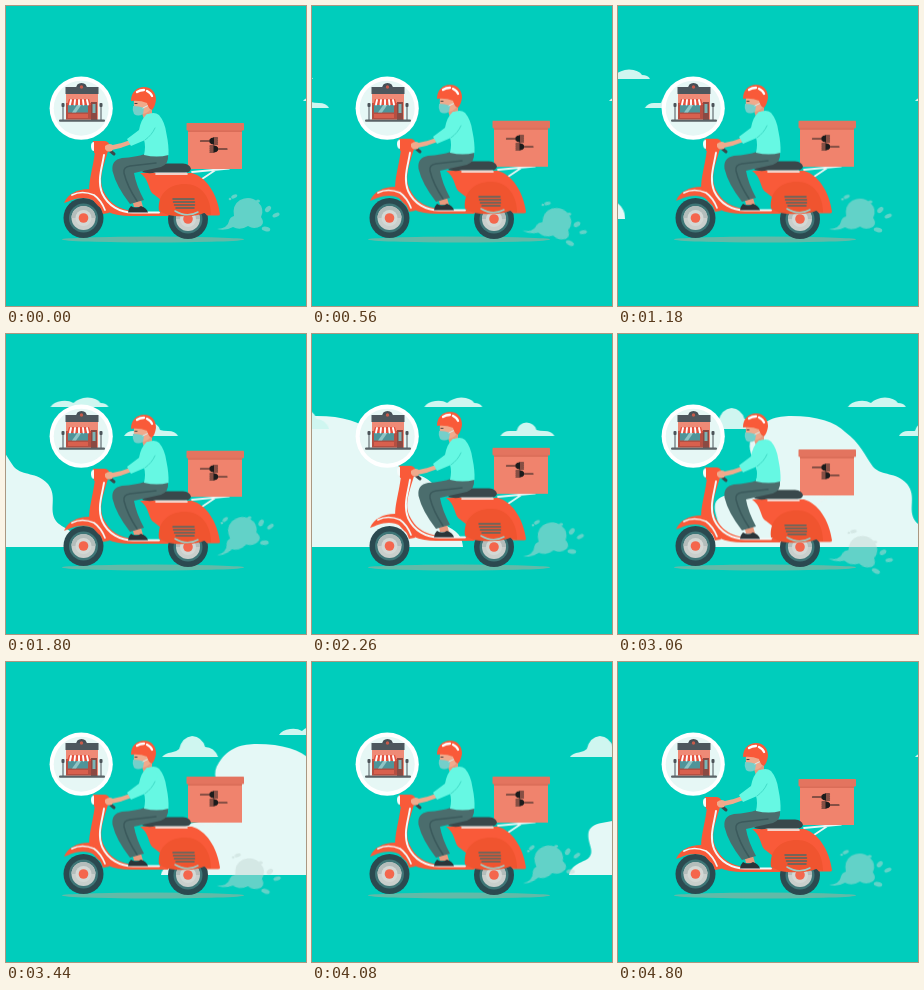
An HTML page that plays this animation: 300 px wide and 300 px high, repeating every 4820 ms.

```html
<!DOCTYPE html>
<html lang="en">
<head>
<meta charset="utf-8">
<title>Scooter delivery</title>
<style>
  html, body { margin: 0; width: 100%; height: 100%; overflow: hidden; background: #00cdbc; }
  svg { display: block; width: 100vw; height: 100vh; }

  :root { --loop: 4820ms; --sine: cubic-bezier(.37, 0, .63, 1); }

  .drift { animation: var(--loop) var(--sine) infinite; }
  .hill { animation-name: hill; animation-delay: -3998ms; }
  .cloud-a { animation-name: cloud-a; }
  .cloud-b { animation-name: cloud-b; animation-delay: -4370ms; }
  .cloud-c { animation-name: cloud-c; animation-delay: -3081ms; }
  @keyframes hill {
    0% { transform: translate(-245px, 213px); }
    83.8%, 100% { transform: translate(305px, 213px); }
  }
  @keyframes cloud-a {
    0% { transform: translate(-57px, 102px); }
    76.3%, 100% { transform: translate(305px, 102px); }
  }
  @keyframes cloud-b {
    0% { transform: translate(-58px, 73px); }
    79.5%, 100% { transform: translate(315px, 73px); }
  }
  @keyframes cloud-c {
    0% { transform: translate(-65px, 95px); }
    61.9%, 100% { transform: translate(297px, 95px); }
  }

  .bob { animation: bob 964ms var(--sine) infinite; }
  @keyframes bob { 0%, 100% { transform: none; } 35% { transform: translateY(-3.2px); } }

  .dust {
    transform-origin: 205px 222px;
    animation: sway 1205ms var(--sine) -602.5ms infinite alternate;
  }
  @keyframes sway { from { transform: rotate(-15deg); } to { transform: rotate(15deg); } }

  .line { fill: none; stroke-linecap: round; stroke-linejoin: round; }
</style>
</head>
<body>
<svg viewBox="0 0 300 300" preserveAspectRatio="none">
  <defs>
    <g id="wheel">
      <circle r="20" fill="#2b4a50"/>
      <circle r="14.5" fill="#3f7677"/>
      <circle r="12" fill="#c9cfcc"/>
      <path d="M-12 0A12 12 0 0 1 12 0Z" fill="#b3bdbb"/>
      <circle r="8" fill="#d3d8d5"/>
      <circle r="4.8" fill="#f4664d"/>
    </g>
    <g id="fork">
      <path class="line" d="M-9 0H1M4 -3H8M4 -1H8M4 1H8M4 3H8" stroke="#1c1c1c" stroke-width="1.2"/>
      <path d="M0 -1.500Q1 -3.600 4.500 -3.600V3.600Q1 3.600 0 1.500Z" fill="#1c1c1c"/>
    </g>
    <g id="lamp">
      <path class="line" d="M0 0V15" stroke="#4b5358" stroke-width="1"/>
      <rect x="-1.5" y="-2" width="3" height="4" rx="1" fill="#4b5358"/>
    </g>
  </defs>

  <!-- scenery -->
  <path class="drift hill" fill="#e5f8f6" d="M0 0C4 -12 14 -12 20 -17C27 -24 18 -32 20 -43C24 -56 46 -50 55 -59C66 -68 62 -76 60 -84C56 -92 51 -102 58 -112C68 -128 82 -131 96 -131C122 -131 140 -125 150 -115C165 -104 170 -91 178 -80C188 -70 200 -76 212 -63C222 -50 212 -38 220 -26C226 -18 241 -18 242 0Z"/>
  <g fill="#cff6f0">
    <path class="drift cloud-a" d="M0 0Q3 -5 9 -5Q14 -5 16 -5Q18 -13 26 -13.5Q34 -13 36 -6Q39 -5 44 -5Q51 -5 54 0Z"/>
    <path class="drift cloud-b" d="M0 0Q3 -5 11 -6Q18 -7 23 -4Q28 -9 37 -9.5Q47 -9 50 -4Q56 -4 58 0Z"/>
    <path class="drift cloud-c" d="M0 0Q3 -4 9 -4.5Q14 -5 17 -8Q20 -20 30 -21Q40 -20 43 -10Q52 -10 56 0Z"/>
  </g>

  <ellipse cx="147" cy="233.500" rx="91" ry="3" fill="#b2ac98" opacity=".55"/>

  <g class="dust" fill="#c4d8d4" opacity=".5">
    <path d="M211 223Q222 222 223 215Q224 211 228 210Q226 199 234 194Q244 189 252 196Q259 203 255 211Q259 217 255 220Q248 224 242 220Q234 225 227 221Q220 225 211 223Z"/>
    <ellipse cx="228" cy="190.500" rx="3.2" ry="1.8" transform="rotate(-25 228 190)"/>
    <circle cx="224" cy="193" r="1.3"/>
    <ellipse cx="252" cy="195" rx="2" ry="1.6"/>
    <ellipse cx="262" cy="203" rx="3.6" ry="2.3" transform="rotate(-45 262 203)"/>
    <ellipse cx="270" cy="209" rx="3.8" ry="2" transform="rotate(-25 270 209)"/>
    <ellipse cx="260" cy="223" rx="4.3" ry="2.3" transform="rotate(12 260 223)"/>
  </g>

  <!-- shop bubble -->
  <circle cx="75.2" cy="102.2" r="31.6" fill="#fff"/>
  <circle cx="75.2" cy="102.2" r="27.5" fill="#e6f7f5"/>
  <g>
    <path d="M70 83Q70 77 75.500 77Q81 77 81 83Z" fill="#454f56"/>
    <rect x="59.500" y="81" width="33" height="7" fill="#4d575d"/>
    <circle cx="75.500" cy="81" r="1.700" fill="#c65b4b"/>
    <rect x="60" y="88" width="32" height="26" fill="#ef8a76"/>
    <rect x="60" y="97" width="25" height="16" fill="#b54f42"/>
    <rect x="62" y="98" width="20" height="8.500" fill="#4f9499"/>
    <path d="M66 106.500L72 98H76L70 106.500Z" fill="#8fc4c4"/>
    <rect x="62" y="108" width="20" height="4" fill="#d8604e"/>
    <rect x="85" y="96" width="6" height="18" fill="#8a4a43"/>
    <rect x="86.500" y="98" width="3" height="9" fill="#7ab5b6"/>
    <path d="M63 93H83L85 99H61Z" fill="#e5503d"/>
    <path class="line" d="M65 94L64 98.500M69 94L68.500 98.500M73 94V98.500M77 94L77.500 98.500M81 94L82 98.500" stroke="#fff" stroke-width="1.900"/>
    <use href="#lamp" x="57" y="99"/>
    <use href="#lamp" x="95" y="99"/>
    <rect x="53" y="113.500" width="46" height="2.300" rx="1" fill="#5a6367"/>
  </g>

  <use href="#wheel" x="77.500" y="212"/>
  <use href="#wheel" x="182" y="213"/>

  <g class="bob">
    <!-- rack and box -->
    <path class="line" d="M188 175H193L211 163M148 166H180M186 166L223 162.500" stroke="#e9f6f4" stroke-width="1.800"/>
    <rect x="182" y="118" width="54" height="45" fill="#f0836d"/>
    <rect x="182" y="124" width="54" height="2" fill="#da6d58"/>
    <rect x="180.500" y="117" width="57.500" height="7.500" rx=".8" fill="#e3745f"/>
    <use href="#fork" x="203.500" y="135"/>
    <use href="#fork" transform="translate(212 143) scale(-1 1)"/>

    <!-- scooter -->
    <path d="M89 145H102C97 162 92 174 98 186C105 200 117 205 136 206H162V210H124C108 210 93 205 85 191C80 182 87 164 89 145Z" fill="#f95a39"/>
    <path d="M58 197C62 188 71 183 83 183C93 184 100 195 103 207L97 208C93 195 85 192 77 192C69 192 64 195 58 197Z" fill="#f95a39"/>
    <path class="line" d="M66 189Q76 184 88 189Q95 194 99 204" stroke="#f3faf9" stroke-width="1.700"/>
    <path class="line" d="M98 149C96 162 91 174 96 187C102 200 114 206.500 127 206.500H153" stroke="#f3faf9" stroke-width="1.900"/>
    <path d="M134 167H186C200 171 211 187 214 208Q214 209.500 212 209.500H201C197 203 190 205 181 205C170 205 166 203 162 210C161 196 152 192 146 187C142 182 143 173 134 167Z" fill="#f95a39"/>
    <path d="M153 205C151 188 163 178 179 178C195 178 205 191 205 209L198 207C190 211 171 211 162 209Z" fill="#f0542f"/>
    <path class="line" d="M167 193H188M167.500 196H188.500M168.500 199H188.500M170 202H188" stroke="#4f6a66" stroke-width="1.500"/>
    <path class="line" d="M169 205Q181 212 192 206" stroke="#9ecdc6" stroke-width="1.500"/>
    <path d="M136 166C143 159 150 158 160 157.500H177Q184 158 185 163Q184 167 178 166.500H150Q142 168 136 166Z" fill="#39484b"/>
    <path class="line" d="M150 168H181" stroke="#f3faf9" stroke-width="1.600"/>
    <path d="M87 135H99Q104 136 104 142Q103 147 98 147H88Z" fill="#f95a39"/>
    <path d="M88 136Q85 136 85 140Q85 145 88 145Z" fill="#f5faf9"/>
    <path class="line" d="M102 143L108 148" stroke="#39484b" stroke-width="3"/>

    <!-- rider -->
    <path d="M127 197L135 194L137 201H128Z" fill="#e99a7d"/>
    <path d="M125 200Q130 203 135 200Q141 202 142 206.500H122Q122 203 125 200Z" fill="#2a3539"/>
    <path d="M139 148L162 149Q163 158 155 161L128 167Q130 179 138 194L124 198Q110 180 106.500 165Q105 154 116 152Q130 151 139 148Z" fill="#4b6d6d"/>
    <path class="line" d="M150 157L124 160Q117 161 118 167Q121 180 131 195" stroke="#3b5a5c" stroke-width="1.500"/>
    <path d="M134 102H146V113H138Z" fill="#e69a7e"/>
    <path class="line" d="M125 136L115 139.500L104 142" stroke="#f0aa8c" stroke-width="4.500"/>
    <path d="M99 140Q104 136 108 140L106 145Q101 147 99 143Z" fill="#f0aa8c"/>
    <path d="M140 109Q148 105 153 109Q159 116 160.500 128Q163 140 162.500 149Q151 152 138 149Q140 140 138 134Z" fill="#66f8e3"/>
    <path d="M141 108Q135 113 133 124L121 133L125 140L138 134.500Q148 127 152 116L149 108Z" fill="#66f8e3"/>
    <path class="line" d="M139 134Q146 129 149 122" stroke="#43dcc8" stroke-width="1"/>
    <path d="M128 94H144V104Q139 110 130 107Q127 101 128 94Z" fill="#f0aa8c"/>
    <path d="M142 97H147Q147 101 144 103Z" fill="#6b453c"/>
    <path d="M127 100Q133 100 138 102L137 108Q132 111 128 108Q126 104 127 100Z" fill="#74cfca"/>
    <path class="line" d="M137 102L143 99" stroke="#d9f0ee" stroke-width="1"/>
    <path class="line" d="M129 97.500H131" stroke="#4b4241" stroke-width="1.200"/>
    <path d="M125 95C125 86 131 81 138 81C146 81 150 87 150 94Q149 101 146 104Q142 102 141 97Q134 94 125 95Z" fill="#f95a39"/>
    <path class="line" d="M131 86Q134 84 138 84M141 85Q145 87 146 90" stroke="#fff" stroke-width="2.300"/>
  </g>
</svg>
</body>
</html>
```
